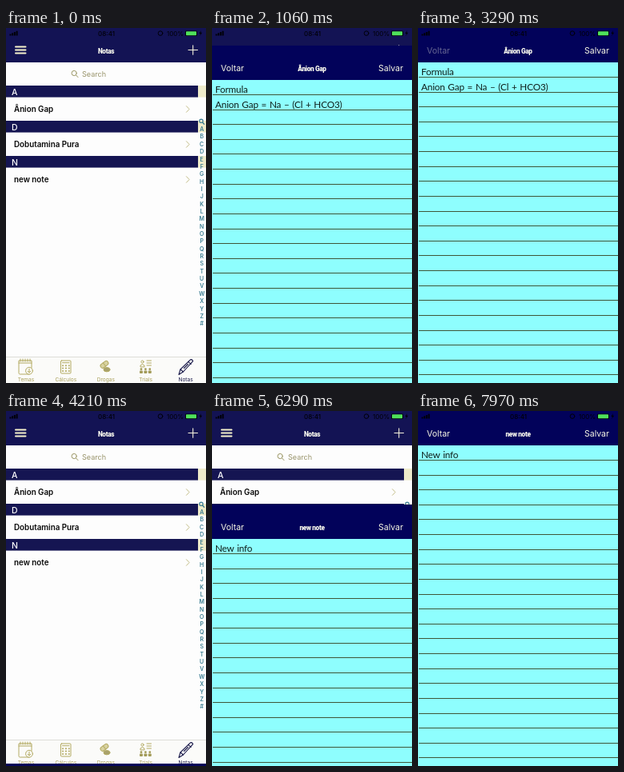
Write an HTML page that moves like this. It is 250 by 444 pixels and loops after 8 s.

```html
<!DOCTYPE html>
<html lang="pt">
<head>
<meta charset="utf-8">
<title>Notas</title>
<style>
html, body { margin: 0; width: 100%; height: 100%; overflow: hidden; background: #fdfdfd; }
svg { display: block; width: 100vw; height: 100vh; font-family: Inter, "Liberation Sans", sans-serif; }
.title { font: 800 8.3px Roboto, sans-serif; letter-spacing: -.36px; fill: #fffff2; text-anchor: middle; }
.ink { font: 400 11.8px Papyrus, Lato, sans-serif; letter-spacing: -.2px; word-spacing: .9px; fill: #10201c; }
.row { font-weight: 600; font-size: 9.8px; fill: #080808; }
.head { font-weight: 500; font-size: 10.5px; fill: #fff; }
.index { font-weight: 600; font-size: 7px; fill: #3b7d92; text-anchor: middle; }
.tab { font-size: 6.6px; text-anchor: middle; }
.bar { font-size: 10.5px; fill: #fbfbe6; }
.line { fill: none; stroke-linecap: round; stroke-linejoin: round; }
</style>
</head>
<body>
<svg viewBox="0 0 250 444" preserveAspectRatio="none">
  <g id="list">
    <rect width="250" height="444" fill="#fdfdfd"/>
    <rect width="250" height="43" fill="#131354"/>
    <path class="line" d="M12 23.5h12.5M12 27.5h12.5M12 31.5h12.5" stroke="#f6f2cc" stroke-width="2"/>
    <text class="title" x="125" y="32">Notas</text>
    <path class="line" d="M228 27.5h11.5M233.7 21.7v11.5" stroke="#f6f2dc" stroke-width="1.1"/>
    <g class="line" stroke="#9a9563"><circle cx="85.2" cy="56.5" r="3.1"/><path d="M87.6 59l2.4 2.6"/></g>
    <text x="95" y="60.7" font-size="9.1" fill="#9a956c">Search</text>
    <g id="rows"></g>
    <g id="index"></g>
    <rect y="411" width="250" height="33" fill="#fbfbf9"/>
    <path d="M0 411.5h250" stroke="#d2d2cc" stroke-width=".7"/>
    <g id="tabs"></g>
    <g class="line" stroke="#b3aa62" stroke-width="1">
      <path d="M29 433H17.5q-1.5 0-1.5-1.5V416h16v9M16 419h16"/>
      <path d="M18 414v3M21 414v3M24 414v3M27 414v3M30 414v3"/>
      <circle cx="29" cy="428.7" r="4.4" fill="#fbfbf9"/>
      <path d="M29 426.2v4.6M27.2 429.2l1.8 1.8 1.8-1.8"/>
      <rect x="68.5" y="416" width="12.5" height="16" rx="1"/>
      <path d="M70.5 418.7h8.5"/>
      <path d="M71 422.3h7.8M71 425.6h7.8M71 429h7.8" stroke-width="2" stroke-dasharray=".1 3.8"/>
      <g transform="rotate(-38 124 423)"><rect x="119" y="418" width="11" height="5.4" rx="2.7" fill="#d8d2a0"/><path d="M124.5 418v5.4"/></g>
      <ellipse cx="126" cy="427.2" rx="4" ry="2.7" fill="#a9a26c"/>
      <circle cx="170.5" cy="417.5" r="1.6"/><path d="M168 423.5v-1.5q2.5-3 5 0v1.5z"/>
      <path d="M176 416h5.5M176 419h5.5M176 422h5.5"/>
    </g>
    <g id="people" fill="#a39b58"></g>
    <g class="line" stroke="#171748" stroke-width="1.1">
      <path d="M216 433.5l2-6.5L230.5 414.8q2-.7 3.2 1.8L221.5 430z" fill="#fbfbf9"/>
      <path d="M218 427l3.5 3M227.8 417.4l3.4 3M222.5 425.5l5-5"/>
    </g>
  </g>
  <g id="note">
    <rect width="250" height="444" fill="#8efefe"/>
    <rect width="250" height="43" fill="#02025a"/>
    <text class="bar" id="back" x="11" y="32.2">Voltar</text>
    <text class="title" id="noteTitle" x="125" y="32"></text>
    <text class="bar" x="208" y="32.2">Salvar</text>
    <g id="rules" stroke="#3f5638" stroke-width="1"></g>
    <text class="ink" id="ink0" x="4" y="59"></text>
    <text class="ink" id="ink1" x="4" y="77.7"></text>
  </g>
  <g id="status" fill="#000008">
    <path d="M4.5 7.5h2v2h-2zM7.2 6.3h2v3.2h-2zM9.9 5h2v4.5h-2zM12.6 3.7h2v5.8h-2z"/>
    <text x="125.5" y="9.5" font-size="8" font-weight="500" text-anchor="middle">08:41</text>
    <circle class="line" cx="193" cy="6.6" r="2.8" stroke="#000008"/>
    <text x="201" y="9.5" font-size="8">100%</text>
    <rect x="224" y="3.6" width="15" height="6.4" rx="1.2"/>
    <rect x="225" y="4.3" width="13" height="5" rx=".7" fill="#4fe05c"/>
    <path d="M244 3l-2.6 4h1.7l-.8 3 2.8-4.2h-1.8z"/>
  </g>
</svg>
<script>
const NS = "http://www.w3.org/2000/svg";
const LOOP = 8000, HEIGHT = 444, RATE = 5.6;
const OPEN_A = 522, CLOSE_A = 3340, OPEN_B = 6053;
const $ = id => document.getElementById(id);

function add(parent, tag, attrs, text) {
  const el = document.createElementNS(NS, tag);
  for (const k in attrs) el.setAttribute(k, attrs[k]);
  if (text) el.textContent = text;
  return parent.appendChild(el);
}

const highlights = [["A", "Ânion Gap"], ["D", "Dobutamina Pura"], ["N", "new note"]].map(([letter, name], i) => {
  const y = 72 + i * 44, g = $("rows");
  add(g, "path", { class: "line", d: `M225.5 ${y + 25.7}l3.6 3.8-3.6 3.8`, stroke: "#c3bd88" });
  const glow = add(g, "rect", { y: y + 14.6, width: 240, height: 29.4, fill: "#e2ddb4", opacity: 0 });
  add(g, "rect", { y, width: 240, height: 14.6, fill: "#151552" });
  add(g, "rect", { x: 240, y, width: 10, height: 14.6, fill: "#eeebca" });
  add(g, "text", { class: "head", x: 7, y: y + 11.5 }, letter);
  add(g, "text", { class: "row", x: 10, y: y + 32.8 }, name);
  return glow;
});

add($("index"), "circle", { class: "line", cx: 244, cy: 116.3, r: 2.2, stroke: "#3b7d92", "stroke-width": 1.2 });
add($("index"), "path", { class: "line", d: "M245.8 118.2l1.9 2", stroke: "#3b7d92", "stroke-width": 1.3 });
[..."ABCDEFGHIJKLMNOPQRSTUVWXYZ#"].forEach((c, i) =>
  add($("index"), "text", { class: "index", x: 244.7, y: 129.1 + i * 9.35 }, c));

["Temas", "Cálculos", "Drogas", "Trials", "Notas"].forEach((name, i) =>
  add($("tabs"), "text", { class: "tab", x: 25 + i * 49.9, y: 441.6, fill: i === 4 ? "#171748" : "#aaa15c" }, name));

for (let i = 0; i < 3; i++) {
  const x = 169 + i * 5.4;
  add($("people"), "circle", { cx: x, cy: 426.7, r: 1.4 });
  add($("people"), "rect", { x: x - 2, y: 428.5, width: 4, height: 3.5, rx: 1 });
}

for (let y = 61.4; y < HEIGHT; y += 18.63)
  add($("rules"), "path", { d: `M1 ${Math.floor(y) + .5}h249` });

const clamp = v => Math.max(0, Math.min(1, v));
const decay = ms => Math.exp(-RATE * ms / 1000);

// Distance of the note sheet from its open position
function sheetOffset(t) {
  if (t < OPEN_A) return HEIGHT;
  if (t < CLOSE_A) return HEIGHT * decay(t - OPEN_A);
  if (t < OPEN_B) return HEIGHT * (1 - decay(t - CLOSE_A));
  return HEIGHT * decay(t - OPEN_B);
}

function draw(t) {
  $("note").setAttribute("transform", `translate(0 ${Math.round(sheetOffset(t))})`);

  const second = t > 5000;
  $("noteTitle").textContent = second ? "new note" : "Ânion Gap";
  $("ink0").textContent = second ? "New info" : "Formula";
  $("ink1").textContent = second ? "" : "Anion Gap = Na – (Cl + HCO3)";

  highlights[0].setAttribute("opacity", t < 400 ? 0 : 1 - clamp((t - CLOSE_A) / 360));
  highlights[2].setAttribute("opacity", t < 5930 ? 0 : 1);
  $("back").setAttribute("opacity", t < 3200 ? 1 : .4 + .6 * clamp((t - CLOSE_A) / 250));
}

const start = performance.now();
function tick() {
  draw((performance.now() - start) % LOOP);
  requestAnimationFrame(tick);
}
tick();
</script>
</body>
</html>
```
